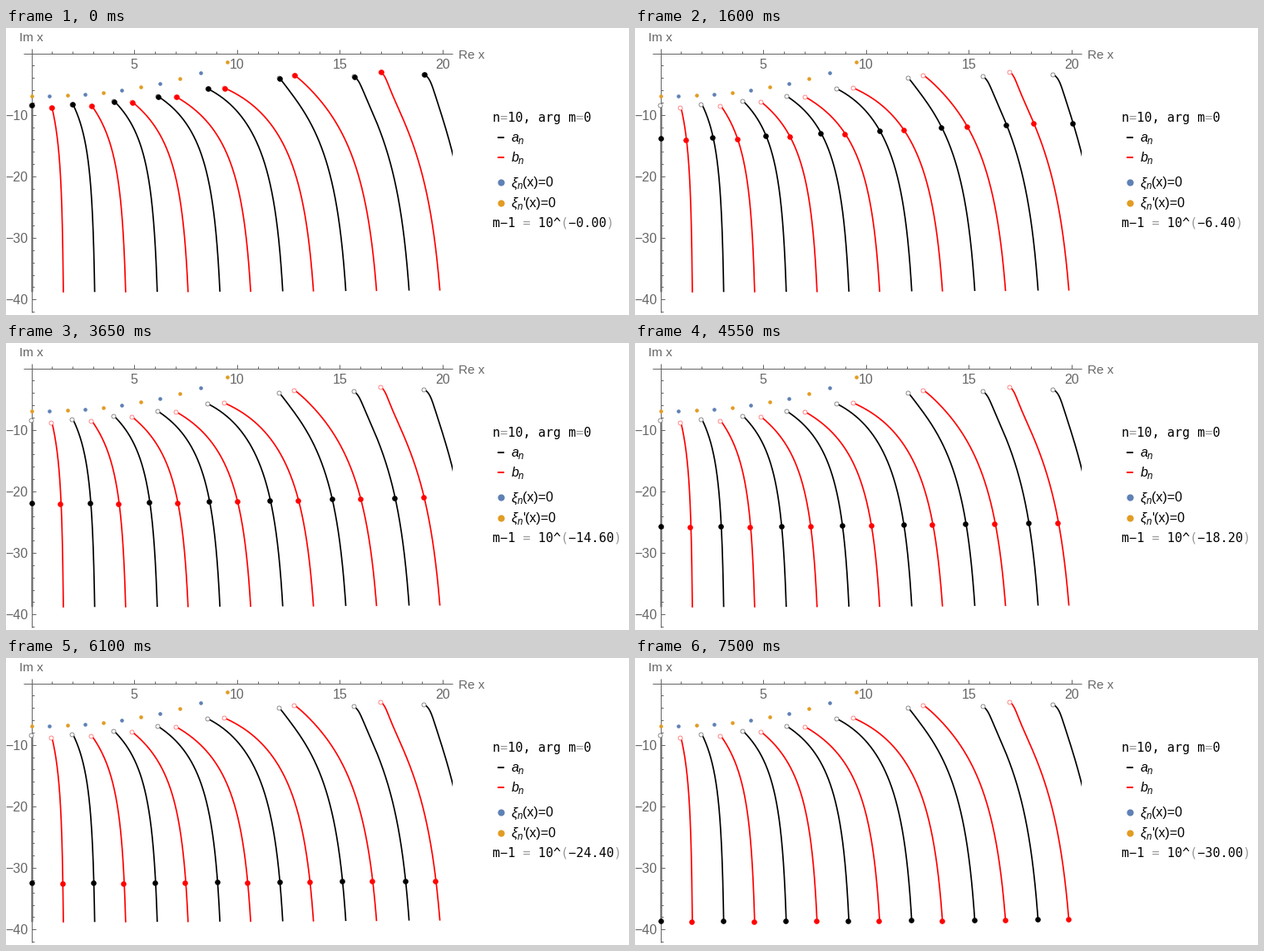
Write a matplotlib script that moves like this. It is 749 by 346 pixels and loops after 7550 ms.

```python
from math import factorial

import matplotlib.pyplot as plt
import numpy as np
from matplotlib.animation import FuncAnimation
from matplotlib.patches import Rectangle

W, H, DPI = 749, 346, 64
FRAMES, INTERVAL = 151, 50
PT = 72 / DPI                      # points per pixel
X0, Y0, SX, SY = 31.5, 31.3, 24.73, 7.42
AXIS = 30.5                        # pixel centre of both axis lines
GREY, BLUE, ORANGE = "#666666", "#5e81b5", "#e19c24"

# Riccati-Hankel function: xi(z) ~ exp(iz) * sum(a_k z^-k)
N = 10
K = np.arange(N + 1)
C = np.array([factorial(N + k) / (factorial(k) * factorial(N - k) * 2.0**k) for k in K])
A = 1j**K * C
B = A.conj()


def ratio(x, d, electric):
    """Equals 1 at the poles of a_n (electric) or b_n for index m = 1 + d."""
    m, ln_m = 1 + d, np.log1p(d)
    pw = x[:, None] ** -K
    dpw = -K * pw / x[:, None]
    p, dp = pw @ A, dpw @ A
    # divided differences stay accurate for tiny d
    diff = pw @ (A * np.expm1(-K * ln_m) / d)
    ddiff = dpw @ (A * np.expm1(-(K + 1) * ln_m) / d)
    pm, dpm = p + d * diff, dp + d * ddiff
    qm, dqm = pw @ (B * m**-K), dpw @ (B * m ** -(K + 1.0))
    wron = p * ddiff - dp * diff
    xi1, xi2 = dp + 1j * p, dqm - 1j * qm
    if electric:
        num = wron - 1j * p * pm - dp * pm
        den = p * xi2 - m * xi1 * qm
    else:
        num = wron + 1j * p * pm + p * dpm
        den = m * p * xi2 - xi1 * qm
    return d * np.exp(2j * m * x) * num / den


def newton(x, d, electric, steps):
    h = 1e-5
    for _ in range(steps):
        r = ratio(x, d, electric)
        slope = np.log(ratio(x + h, d, electric) / r) / h
        x = x - np.log(r) / slope
    return x


def trace(orders, electric, sub=4):
    """Follow the poles from m - 1 tiny back to the start."""
    s = np.linspace(30, 0, (FRAMES - 1) * sub + 1)
    x = 0.974 * np.pi * orders - 38.5j
    path = [newton(x, 10 ** (-2 - s[0]), electric, 25)]
    for v in s[1:]:
        guess = 2 * path[-1] - path[-2] if len(path) > 1 else path[-1]
        path.append(newton(guess, 10 ** (-2 - v), electric, 4))
    return np.array(path[::-1]), sub


def to_px(z, dx=0.0, dy=0.0):
    return X0 + SX * np.real(z) + dx, Y0 - SY * np.imag(z) + dy


fig = plt.figure(figsize=(W / DPI, H / DPI), dpi=DPI, facecolor="white")
ax = fig.add_axes([0, 0, 1, 1])
ax.set_xlim(0, W)
ax.set_ylim(H, 0)
ax.axis("off")
clip = Rectangle((0, 0), 537, H, transform=ax.transData)


def line(xs, ys, color, width, z=2, **kw):
    return ax.plot(xs, ys, color=color, lw=width * PT, zorder=z,
                   **{"solid_capstyle": "butt", **kw})[0]


def dots(x, y, size, color, z, **kw):
    return ax.scatter(x, y, s=(size * PT) ** 2, c=color, zorder=z,
                      **{"linewidths": 0, **kw})


def text(x, y, s, size=16, color="black", ha="left", va="baseline",
         font="Liberation Sans", **kw):
    return ax.text(x, y, s, fontsize=size * PT, color=color, ha=ha, va=va,
                   family=font, **kw)


def mono(x, y):
    kw = dict(size=15.15, font="DejaVu Sans Mono")
    return text(x, y, "", **kw), text(x, y, "", color="#999999", **kw)


def set_mono(pair, s):
    light = "=()"
    pair[0].set_text("".join(" " if c in light else c for c in s).rstrip())
    pair[1].set_text("".join(c if c in light else " " for c in s).rstrip())


# axes
line([21, 537], [AXIS, AXIS], GREY, 1, 4)
line([AXIS, AXIS], [25, 343], GREY, 1, 4)
for i in range(21):
    x = AXIS + SX * i
    line([x, x], [AXIS, AXIS - (5 if i % 5 == 0 else 3)], GREY, 1, 4)
    if i and i % 5 == 0:
        text(x, 49, str(i), color=GREY, ha="center")
for i in range(2, 43, 2):
    y = AXIS + SY * i
    line([AXIS, AXIS + (5 if i % 10 == 0 else 3)], [y, y], GREY, 1, 4)
    if i % 10 == 0:
        text(26.5, y + 6, f"\u2212{i}", color=GREY, ha="right")
text(30.5, 16, "Im x", 15.3, GREY, ha="center")
text(543.5, 37, "Re x", 15.3, GREY)

# zeros of xi and xi'
xi_zeros = np.roots(A)
dxi_zeros = np.roots(1j * np.append(A, 0) - np.append(0, K * A))
for zeros, color in ((xi_zeros, BLUE), (dxi_zeros, ORANGE)):
    dots(*to_px(zeros[zeros.real > -0.05], -0.6, -0.4), 4.6, color, 5)

# pole trajectories
movers = []
for orders, electric, color, pale in (
    (np.arange(8.0), True, "black", "#777777"),
    (np.arange(7) + 0.5, False, "red", "#ff7070"),
):
    path, sub = trace(orders, electric)
    px, py = to_px(path)
    for j in range(len(orders)):
        curve = line(px[:, j], py[:, j], color, 1.7, 3,
                     solid_capstyle="projecting", snap=False)
        curve.set_clip_path(clip)
    dots(*to_px(path[0], -1.7, -0.8), 5, "white", 6, edgecolors=pale,
         linewidths=0.8 * PT)
    spots = np.stack(to_px(path[::sub], -0.8, -0.3), axis=-1)
    mark = dots(*spots[0].T, 6.6, color, 7)
    mark.set_clip_path(clip)
    movers.append((mark, spots))

# legend
set_mono(mono(585, 113), "n=10, arg m=0")
counter = mono(585, 240)
for y, name, color in ((131.5, "a", "black"), (155.5, "b", "red")):
    line([591, 599], [y, y], color, 2)
    text(607.5, y + 5.5, name, style="italic")
    text(616, y + 8.5, "n", 11.5, style="italic")
for y, prime, color in ((186.4, "", BLUE), (211, "'", ORANGE)):
    dots([595], [y], 8.2, color, 5)
    text(607.5, y + 5, "\u03be", style="italic")
    text(615, y + 8, "n", 11.5, style="italic")
    text(621, y + 5, prime + "(x)=0")


def update(i):
    for mark, spots in movers:
        mark.set_offsets(spots[i])
    set_mono(counter, f"m\u22121 = 10^(\u2212{0.2 * i:.2f})")
    return []


anim = FuncAnimation(fig, update, frames=FRAMES, interval=INTERVAL,
                     init_func=lambda: update(0), repeat=True,
                     repeat_delay=0, blit=False)
plt.show()
```
